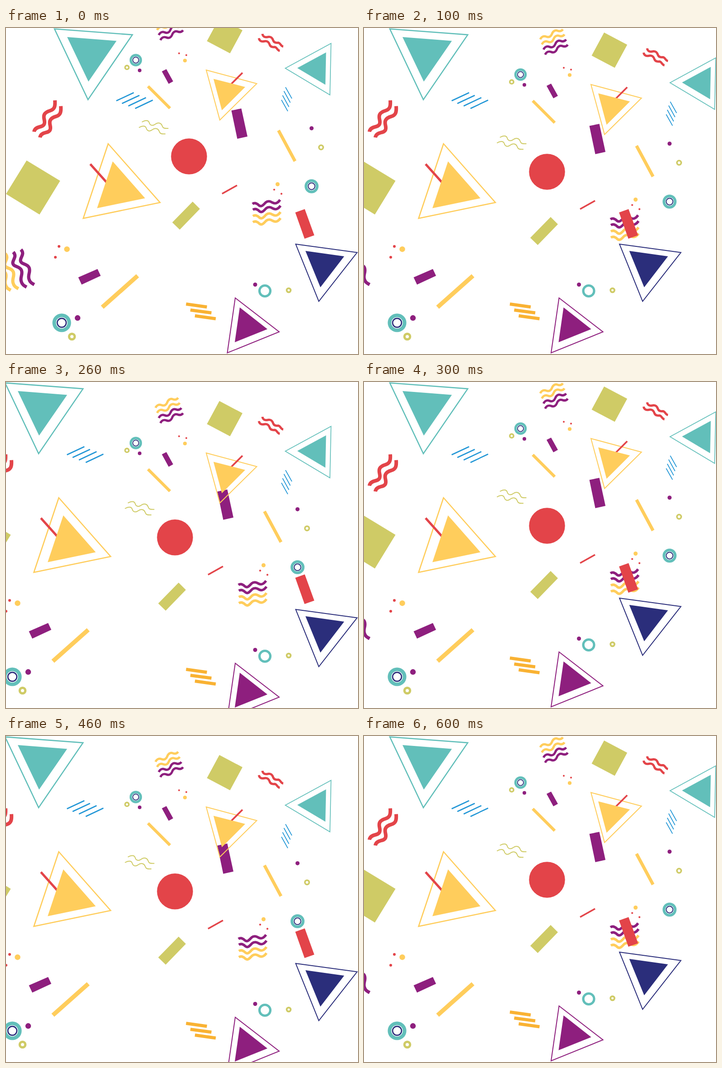
These frames come from a looping animation (777 by 721 pixels, 0.7 s). An HTML page:

```html
<!DOCTYPE html>
<html lang="en">
<head>
<meta charset="utf-8">
<title>Jumping shapes</title>
<style>
  html, body { margin: 0; width: 100%; height: 100%; overflow: hidden; background: #fff; }
  svg { display: block; width: 777px; height: 721px; }
</style>
</head>
<body>
<svg id="stage" viewBox="0 0 777 721"></svg>
<script>
const TEAL = '#62bfba', NAVY = '#2b2e7b', RED = '#e34449', YELLOW = '#ffcd5c',
      OLIVE = '#cfcb66', PURPLE = '#8e1f7e', BLUE = '#2196d6', ORANGE = '#f9b233';

const STEP = 100;
const POSES = [0, 1, 2, 1, 2, 0, 1];

const stage = document.getElementById('stage');
const groups = [];
let layer;

function add(tag, attrs) {
  const node = document.createElementNS('http://www.w3.org/2000/svg', tag);
  for (const key in attrs) node.setAttribute(key, attrs[key]);
  return (layer || stage).appendChild(node);
}

// A cluster of shapes that jumps between three offsets.
function group(offsets, draw) {
  layer = null;
  layer = add('g', {});
  groups.push({ node: layer, offsets });
  draw();
}

const poly = (points, fill) => add('polygon', { points, fill });
const outline = (points, stroke, width) =>
  add('polygon', { points, fill: 'none', stroke, 'stroke-width': width });
const dot = (cx, cy, r, fill) => add('circle', { cx, cy, r, fill });
const ring = (cx, cy, r, stroke, width) =>
  add('circle', { cx, cy, r, fill: 'none', stroke, 'stroke-width': width });
const line = (x1, y1, x2, y2, stroke, width) =>
  add('line', { x1, y1, x2, y2, stroke, 'stroke-width': width });
const wave = (d, stroke, width, x = 0, y = 0) =>
  add('path', { d, fill: 'none', stroke, 'stroke-width': width, transform: `translate(${x} ${y})` });

function target(x, y, r) {
  dot(x, y, r, TEAL);
  dot(x, y, r * 0.61, '#fff');
  ring(x, y, r * 0.48, NAVY, r * 0.13);
}

group([[0, 0], [0, 34], [-31, 59.7]], () => {
  const thin = 'M300 208C307 204 314 203 316 209C318 216 324 217 329 213C337 207 343 211 345 217C347 223 352 222 358.500 222';
  wave(thin, OLIVE, 2);
  wave(thin, OLIVE, 2, -6.5, 12.3);
  dot(404, 284, 39.7, RED);
  poly('497.5,182.500 519.500,178 533,240 510.500,245', PURPLE);
  dot(674.5, 221.7, 4.5, PURPLE);
  ring(695.5, 264, 4.7, OLIVE, 3.6);
  line(601.5, 226.5, 638, 294.5, YELLOW, 7);
  target(674.5, 350, 15.4);
  dot(599.5, 345.5, 4.5, YELLOW);
  dot(592, 357.5, 2.1, RED);
  dot(608, 366.7, 2.1, RED);
  line(477, 366.5, 510, 348, RED, 3.6);
  poly('367,430 412,384 428,400 383.5,446', OLIVE);
  const thick = 'M544 389C550 385 555 389 558 392C564 397 568 391 573 386C579 381 584 384 588 386C595 390 600 387 605 380';
  wave(thick, PURPLE, 5.6);
  wave(thick, PURPLE, 5.6, 1, 13);
  wave(thick, YELLOW, 5.6, 1, 27);
  wave(thick, YELLOW, 5.6, 1, 40.5);
});

group([[0, 0], [-75.5, 0], [0, 25]], () => {
  poly('638.5,408 659.5,400.5 680.5,458.5 659,466', RED);
  outline('639.5,478 775,496.5 690.5,604.5', NAVY, 2);
  poly('661,493 746.5,505 694,573.5', NAVY);
  dot(550, 567.5, 4.5, PURPLE);
  ring(571.5, 581.5, 12, TEAL, 5.2);
  ring(624, 580, 4.4, OLIVE, 3.8);
  line(397.5, 610.5, 443.5, 617, ORANGE, 7);
  line(407, 623.7, 453.5, 630, ORANGE, 7);
  line(417, 636.5, 463, 643, ORANGE, 7);
  outline('506,597 603,672 488.5,718.5', PURPLE, 2);
  poly('516,618 577,666 505,695', PURPLE);
});

group([[0, 0], [-50, 0], [-109, 0]], () => {
  outline('107,2 279,15 181,158.5', TEAL, 2.6);
  poly('135,20 244,28.5 182,118.5', TEAL);
  line(243.5, 161, 282, 143, BLUE, 2.5);
  line(256, 167, 294.5, 149, BLUE, 2.5);
  line(270, 172.5, 309, 154, BLUE, 2.5);
  line(285, 178, 324, 159.5, BLUE, 2.5);
  const zig = 'M108 160C109 174 107 180 97 183C84 187 82 193 84.500 203C87 214 82 217 75 218.500C68 220 63 223 62 229.500';
  wave(zig, RED, 8);
  wave(zig, RED, 8, 13, 12.7);
  outline('225.5,256 340,386 170.5,421', YELLOW, 2.6);
  line(186, 301, 224, 343.5, RED, 5);
  poly('235.5,295 307,376.5 201,398.5', YELLOW);
  poly('45.5,293 119.5,338 74,412.5 0,367', OLIVE);
  dot(117, 483, 3, RED);
  dot(109, 507, 3, RED);
  dot(134.5, 489.2, 6.2, YELLOW);
  poly('159.5,551.5 202,533 209,548 167,567.5', PURPLE);
  line(212.5, 617.5, 290.5, 548, YELLOW, 9.5);
  target(123, 652, 20.6);
  dot(158, 641.3, 6.2, PURPLE);
  ring(145.5, 682.5, 6.2, OLIVE, 5.2);
  const curl = 'M33 490C42 500 32 506 32 514C33 524 46 520 51 530C55 540 47 546 51 556C53 563 58 565 62.500 567.500';
  wave(curl, PURPLE, 7.2);
  wave(curl, PURPLE, 7.2, -17, 5.5);
  wave(curl, YELLOW, 7.2, -35, 9);
  wave(curl, YELLOW, 7.2, -52, 12.5);
});

group([[0, -64], [59, -32], [0, 0]], () => {
  const ripple = 'M330 57C333 51 338 49 343 51C350 54 354 50 356 45C358 39 363 36 368 38C373 40 377 39 380 35';
  [YELLOW, YELLOW, PURPLE, PURPLE].forEach((color, i) => wave(ripple, color, 5, 3.6 * i, 11.3 * i));
  poly('471,42 522,69 494.5,120 443.5,93', OLIVE);
  const zag = 'M566 77C567 84 573 85 577 84C585 82 588 86 590 92C592 97 597 97 601 96.500C606 97 606 104 612 105';
  wave(zag, RED, 5);
  wave(zag, RED, 5, -7.7, 9.5);
  outline('717.5,98 616.5,153 715,212', TEAL, 1.7);
  poly('706.5,118 643,152.5 705,189.5', TEAL);
  target(286.5, 135, 13.7);
  ring(267, 151.2, 4.2, OLIVE, 3.4);
  dot(295, 157.8, 4, PURPLE);
  dot(382, 120, 2, RED);
  dot(398, 124, 2, RED);
  dot(395, 136, 4.1, YELLOW);
  poly('344,160 354,155 369,182 359,187.5', PURPLE);
  line(313.5, 193, 362, 241.5, YELLOW, 6.5);
  outline('442,157 553.5,187 472,267.5', YELLOW, 2);
  line(522, 163, 495, 190, RED, 3.8);
  poly('458,176.5 528,194.5 476.5,246', YELLOW);
  line(617, 195, 631, 220, BLUE, 1.7);
  line(613.5, 203.5, 627.5, 229, BLUE, 1.7);
  line(610.5, 213, 624.5, 238.5, BLUE, 1.7);
  line(608, 223, 622, 248, BLUE, 1.7);
});

function render(time) {
  const pose = POSES[Math.floor(time / STEP) % POSES.length];
  for (const { node, offsets } of groups) {
    node.setAttribute('transform', `translate(${offsets[pose].join(' ')})`);
  }
}

const start = performance.now();
function tick() {
  render(performance.now() - start);
  requestAnimationFrame(tick);
}
tick();
</script>
</body>
</html>
```
